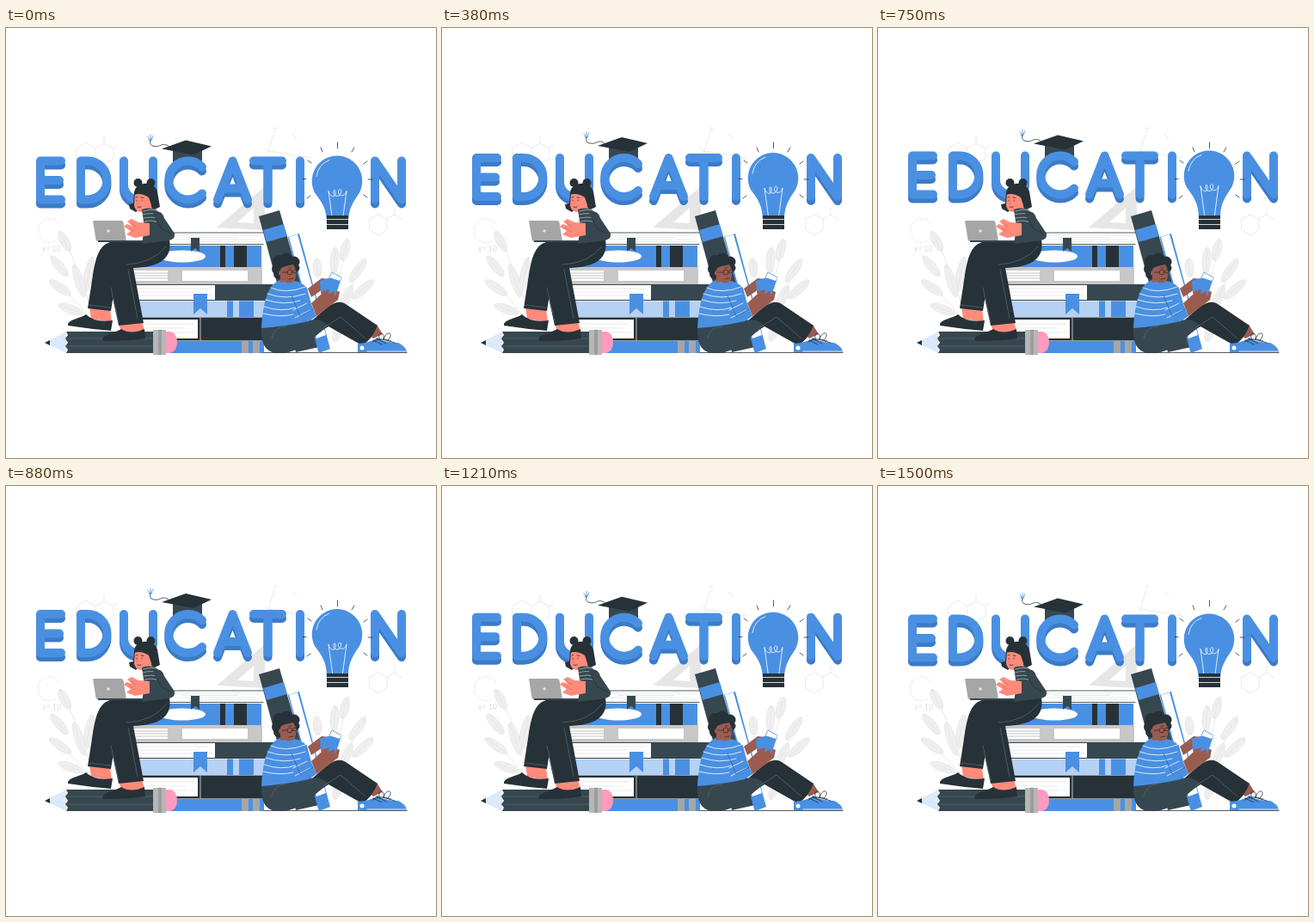
Write an HTML page that moves like this. It is 500 px wide and 500 px high and loops after 1540 ms.

```html
<!DOCTYPE html>
<html lang="en">
<head>
<meta charset="utf-8">
<title>Education</title>
<style>
html, body { margin: 0; width: 100%; height: 100%; overflow: hidden; background: #fff; }
svg { display: block; width: 100vw; height: 100vh; }
.b { fill: #4a90e2 } .d { fill: #263238 } .s { fill: #37474f }
.g { fill: #c7c7c7 } .w { fill: #fff } .p { fill: #ff8b7b } .k { fill: #9b5c50 }
.line { fill: none; stroke-width: .8; stroke-linecap: round; stroke-linejoin: round; }
.dark { stroke: #263238 } .pale { stroke: #e4e4e4 } .white { stroke: #fff } .mid { stroke: #55666e }
#word { fill: none; stroke-width: 10; stroke-linecap: round; stroke-linejoin: round; }
</style>
</head>
<body>
<svg viewBox="0 0 500 500">
<defs>
  <path id="word" d="M64 154H40V199H64M40 176.500H62
    M87 154V199H95A22.500 22.500 0 0 0 95 154Z
    M137 154V182A17 17 0 0 0 171 182V154
    M228 161A22.500 22.500 0 1 0 228 192
    M246 199L263.500 154L281 199M252 186H275
    M288 154H321M304.500 154V199M342 154V199
    M429 199V154L460 199V154"/>
</defs>

<!-- backdrop -->
<g class="line pale">
  <path d="M82 140L93 133L104 140V152L93 158L82 152ZM104 140L114 134L125 140V152L114 158L104 152M114 134V126M125 140L130 136"/>
  <path d="M313 117L305 143L354 151M311 116L316 117M301 139L307 147M333 124L338 128"/>
  <path d="M423 222L433 217L443 222V235L433 241L423 235ZM443 222L452 217L461 223M452 217V209"/>
  <path d="M58 248A14 14 0 1 1 62 227" stroke-dasharray="4 2"/>
  <path d="M64 240C83 273 93 310 106 349M98 272L103 323M52 298Q78 308 94 335M382 258Q390 310 385 348M418 270Q396 300 389 355M398 249L382 310"/>
</g>
<text x="42" y="260" font-family="Lato, sans-serif" font-size="9" font-style="italic" fill="#dcdcdc">x= 10</text>
<g id="leaves" fill="#efefef" stroke="#e2e2e2" stroke-width=".6"></g>
<path d="M245 232L301 184V235ZM269 226L288 209V227Z" fill="#e6e6e6" fill-rule="evenodd"/>

<!-- floating title -->
<g id="title">
  <path class="s" d="M194 141L228 139V158H194Z"/>
  <path class="d" d="M181 140L209 130L239 137L218 147Z"/>
  <path class="line dark" d="M209 137Q196 137 191 139C183 130 179 139 173 137C168 137 167 134 168 130"/>
  <path class="line" stroke="#4a90e2" d="M168 131L165 126M168 131L168 124M168 131L171 125M166 130L170 129"/>
  <use href="#word" y="5" stroke="#3b7bc8"/>
  <use href="#word" stroke="#4a90e2"/>
  <path class="b" d="M385 148A29.500 29.500 0 0 0 359 191C367 202 373 209 373 227H398C398 209 404 202 411 191A29.500 29.500 0 0 0 385 148Z"/>
  <path class="line white" stroke-width="1.300" d="M361 172Q363 158 376 153"/>
  <path class="line white" d="M380 226L375 189C376 196 384 198 383 190C382 183 378 195 385 195C391 195 391 184 387 188C384 194 394 198 396 189L391 226"/>
</g>
<path class="line dark" d="M345 175.500H349M421 176H426M351 154L355 157M366 139L368 144M385.500 133V140M405 139L402 144M420 155L416 158M350 198L354 195M420 197L416 194"/>
<path class="d" d="M373 218H398V234H373Z"/>
<path class="line white" d="M373 222.500H398M373 228.500H398"/>

<!-- stacked books -->
<path class="w" d="M150 238H299V252H150Z"/>
<path class="line dark" d="M185 238H299M185 251.500H299"/>
<path class="line pale" d="M196 241H296M205 243.500H270M196 246H290M210 248.500H296"/>
<path class="b" d="M150 253H297V278H150Z"/>
<ellipse class="w" cx="205" cy="265.500" rx="27" ry="7"/>
<path class="d" d="M249 253H255V278H249ZM265 253H280V278H265Z"/>
<path class="s" d="M215 244H225V260L220 256L215 260Z"/>
<path class="g" d="M140 278H298V298H140Z"/>
<path class="w" d="M142 282H188V294H142ZM205 282H281V294H205Z"/>
<path class="line" stroke="#b5b5b5" d="M142 285H188M142 288H188M142 291H188"/>
<path class="s" d="M140 298H312V317H140Z"/>
<path class="w" d="M140 299H243V316H140Z"/>
<path class="line pale" d="M150 303H238M150 307H225M150 311H240"/>
<path d="M140 317.500H303V336H140Z" fill="#b5d1f4"/>
<path class="b" d="M257 317.500H264V336H257ZM271 317.500H288V336H271ZM218 309H234V333L226 326L218 333Z"/>
<path class="d" d="M140 336.500H300V363.500H140Z"/>
<path class="w" d="M140 339H223V361H140Z"/>
<path class="line pale" d="M150 344H218M150 349H210M150 354H220M226 337V363"/>
<path class="b" d="M140 364H300V378H140Z"/>
<path d="M274 364H282V378H274ZM287 364H295V378H287Z" fill="#a6a6a6"/>
<path class="line dark" d="M300 377.500H466"/>

<!-- leaning books -->
<path class="s" d="M294 219L318 212L364 371L337 377Z"/>
<path class="b" d="M299 235L323 228L327 242L303 249Z"/>
<path class="b" d="M328 243L341 239L377 373L364 378Z"/>
<path class="w" d="M329 243L339 240L372 357L361 361Z"/>
<path class="line" stroke="#4a90e2" d="M328 243L364 378"/>

<!-- pencil -->
<path d="M45 366L70 353V378Z" fill="#dce9fa"/>
<path class="d" d="M45 366L51 363V369Z"/>
<path class="s" d="M70 353H172V378H70L72 374L69 370L72 366L69 361L72 357Z"/>
<path class="line mid" d="M71 361H171M71 370H171"/>
<path d="M184 353H191Q199 355 199 365.500T191 378H184Z" fill="#ff9bbc"/>
<path d="M171 351H186V380H171Z" fill="#b7b7b7"/>
<path class="line" stroke="#777" d="M178 351V380M180 351V380"/>

<!-- girl with laptop -->
<path class="p" d="M97 324L121 327L123 342L99 338ZM131 343L158 341L161 352L135 357Z"/>
<path class="d" d="M72 344C75 338 86 338 93 333Q103 343 124 340L122 352Q98 350 72 346ZM112 362C114 356 125 355 134 350Q145 357 161 350L162 361Q145 364 113 364Z"/>
<path class="d" d="M188 246L121 249C107 253 104 270 101 287L95 326L122 329L128 291L142 279Z"/>
<path class="d" d="M190 246C194 270 176 278 148 279L160 343L131 346L121 300C118 276 122 266 140 258Z"/>
<path class="line mid" stroke-width=".6" d="M186 254Q170 274 140 275M142 281L153 338M122 302L131 342M96 322L121 325"/>
<circle class="d" cx="153.500" cy="180" r="5"/><circle class="d" cx="168.500" cy="180" r="5"/>
<path class="d" d="M149 191C151 178 172 177 176 190L179 208L173 211L160 205L151 214L144 210L143 205L148 204Z"/>
<path class="p" d="M150 192L149 206C150 214 158 216 162 212L161 220H173L169 207V192Z"/>
<path class="d" d="M149 194C153 184 170 183 172 193L170 209L166 197Q157 191 149 194Z"/>
<path class="line dark" d="M152 200V201M158 200V201M151 197L153 196.500M157 197L160 197.500M153 208Q155 209 157 208"/>
<path class="line" stroke="#e86f68" d="M154 201L152 205H154"/>
<path class="s" d="M158 211Q174 206 180 218L190 247L158 251L161 232Z"/>
<path class="line" stroke="#aeb8bc" d="M160 213Q168 210 176 212M159 217Q169 214 178 217M160 221Q169 219 177 221M161 225Q168 223 175 225"/>
<path class="s" d="M171 215Q181 210 184 221L196 239Q197 247 187 247L163 242L166 230L179 233Z"/>
<path class="line dark" stroke-width=".6" d="M174 221L181 234L192 239"/>
<path class="p" d="M167 227L154 226L146 222L141 225L147 230L140 228L137 231L145 236L140 240L150 244L167 241Z"/>
<path class="line" stroke="#d86560" stroke-width=".6" d="M145 227L151 231M144 233L150 236"/>
<path d="M101 224H134Q136 224 136.500 226L140 248H107Q105 248 104.500 246Z" fill="#a6a6a6"/>
<circle cx="119" cy="236" r="1.800" fill="#e0e0e0"/>
<path class="s" d="M107 247H159V249H107Z"/>

<!-- reader -->
<path class="k" d="M351 303L367 291L376 292L371 302L355 313Z"/>
<path class="k" d="M419 354L431 345L438 356L427 361Z"/>
<path class="d" d="M297 347C296 370 304 379 320 378C345 377 360 355 375 347L414 369Q426 362 432 346L395 321C382 313 370 329 356 340Z"/>
<path class="s" d="M297 347C296 370 304 379 320 378C345 377 360 355 375 347Q367 337 354 340Z"/>
<path class="line mid" stroke-width=".6" d="M309 361Q312 346 326 347M370 348L389 336L418 361"/>
<path class="b" d="M319 293C305 298 299 317 297 349Q325 347 352 341L361 335L355 321L350 302Q339 291 328 295Z"/>
<path class="line white" stroke-width=".7" d="M308 302Q325 310 348 301M304 309Q326 317 348 309M302 316Q323 323 342 317M300 324Q320 331 337 325M299 332Q319 337 334 333M336 337L354 328M334 328L350 320"/>
<path class="line" stroke="#2f66a8" d="M332 311L342 335L357 327"/>
<path class="k" d="M355 320L366 310L379 303L388 307L386 316L361 335Z"/>
<path class="b" d="M365 294L378 290L390 291L383 311L366 307Z"/>
<path class="w" d="M376 290L379 284L390 290L388 294Z"/>
<path class="line" stroke="#4a90e2" d="M376 290L379 284L390 290"/>
<path class="k" d="M366 307L376 304L375 309L382 306L382 312L369 318Z"/>
<g class="d">
  <circle cx="318" cy="272" r="8"/><circle cx="326" cy="269" r="7.500"/><circle cx="335" cy="272" r="6.500"/>
  <circle cx="316" cy="280" r="7"/><circle cx="317" cy="286" r="6"/><circle cx="337" cy="279" r="4.500"/>
</g>
<path class="k" d="M322 278L334 275L338 283L336 293Q331 299 324 295L319 296V287Q318 279 322 278Z"/>
<circle class="k" cx="320" cy="285" r="3"/>
<g class="line dark">
  <circle cx="330" cy="284" r="3"/><circle cx="336" cy="283" r="2"/>
  <path d="M321 284L327 284M329 279H332M329 292L334 291"/>
</g>
<path class="b" d="M409 367Q424 366 432 360Q441 366 456 366Q465 370 466 377H409Z"/>
<circle class="w" cx="414" cy="372" r="2.500"/>
<path class="line white" stroke-width=".6" d="M420 376H465"/>
<path class="line dark" d="M427 363L437 368M431 361L442 367M435 363C430 353 441 352 439 362C443 350 452 355 444 363M438 362L452 366M426 365Q434 359 448 364"/>
</svg>
<script>
// x, y, tilt, half length
const leaves = [
  [68, 248, -28, 13], [96, 287, 12, 21], [62, 277, -40, 15], [63, 302, -55, 15], [75, 327, -70, 15],
  [85, 294, -18, 20], [103, 343, -80, 17], [382, 270, 4, 15], [394, 258, 14, 13], [409, 282, 35, 16],
  [362, 279, -5, 11], [415, 304, 48, 16], [396, 313, 25, 15], [386, 353, 20, 12]
];
document.getElementById('leaves').innerHTML = leaves.map(([x, y, tilt, r]) =>
  `<g transform="translate(${x} ${y}) rotate(${tilt})"><ellipse rx="5" ry="${r}"/><path d="M0 ${-r}V${r}"/></g>`).join('');

const title = document.getElementById('title');
const LOOP = 1540, LOWEST = 1500;

function draw() {
  const phase = (performance.now() - LOWEST) / LOOP * 2 * Math.PI;
  title.setAttribute('transform', `translate(0 ${3 * Math.cos(phase) - 2.5})`);
  requestAnimationFrame(draw);
}
draw();
</script>
</body>
</html>
```
